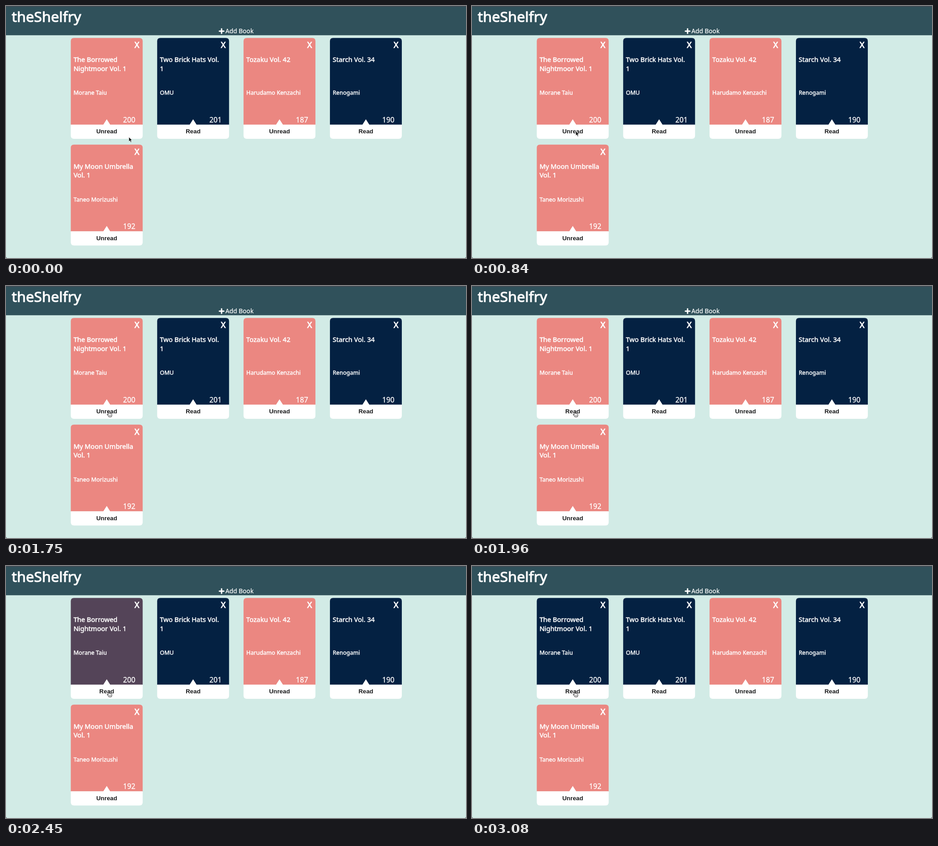
Recreate the animation shown at these times as an HTML page. Size 1011 by 554 pixels, loop 3150 ms.

```html
<!DOCTYPE html>
<html lang="en">
<head>
<meta charset="utf-8">
<title>Book shelf</title>
<style>
  html, body { margin: 0; width: 100%; height: 100%; overflow: hidden; background: #d2ebe6; }
  svg { display: block; width: 100vw; height: 100vh; }
  text { font-family: "Noto Sans", "Open Sans", sans-serif; fill: #fff; stroke: #fff; stroke-width: .3px; stroke-linejoin: round; }
  .brand { font-size: 31.8px; stroke-width: 1.1px; }
  .add { font-size: 13.7px; stroke-width: .2px; }
  .title { font-size: 14.6px; stroke-width: .55px; }
  .author { font-size: 12.6px; stroke-width: .45px; }
  .pages { font-size: 15.8px; }
  .close { font-size: 18px; stroke-width: 1px; text-anchor: middle; }
  .state { font: bold 13.33px "Liberation Sans", Arial, sans-serif; fill: #1b1c1d; stroke: none; text-anchor: middle; }
  .unread { fill: #eb8781; }
  .read { fill: #042142; }

  .toggle .cover { animation: cover 3150ms infinite; }
  .toggle .before { animation: before 3150ms step-end infinite; }
  .toggle .after { animation: after 3150ms step-end infinite; }
  .arrow { animation: glide 3150ms infinite, arrow 3150ms step-end infinite; }
  .hand { animation: nudge 3150ms step-end infinite, hand 3150ms step-end infinite; }

  @keyframes cover {
    0%, 62.2% { fill: #eb8781; animation-timing-function: cubic-bezier(.25, .25, .6, 1); }
    94%, 100% { fill: #042142; }
  }
  @keyframes before { 0% { opacity: 1; } 61.9%, 100% { opacity: 0; } }
  @keyframes after { 0% { opacity: 0; } 61.9%, 100% { opacity: 1; } }
  @keyframes glide {
    0%, 2.2% { transform: translate(270px, 288px); animation-timing-function: ease-in-out; }
    22.2%, 100% { transform: translate(228px, 275px); }
  }
  @keyframes arrow { 0% { opacity: 1; } 37.77%, 100% { opacity: 0; } }
  @keyframes nudge {
    0% { transform: translate(223px, 275px); }
    53.3%, 100% { transform: translate(221.5px, 275px); }
  }
  @keyframes hand { 0% { opacity: 0; } 37.77%, 100% { opacity: 1; } }
</style>
</head>
<body>
<svg viewBox="0 0 1011 554" preserveAspectRatio="none">
  <rect width="1011" height="554" fill="#d2ebe6"/>
  <rect width="1011" height="64.3" fill="#30515b"/>
  <rect width="1011" height="1.5" fill="#434a54"/>
  <path d="M0 551Q0 554 3 554H0ZM1011 551Q1011 554 1008 554H1011Z" fill="#34434a"/>
  <text class="brand" x="12.5" y="35">theShelfry</text>
  <path d="M473.8 50.3V60M469 55.2H478.7" stroke="#fff" stroke-width="3" stroke-linecap="round"/>
  <text class="add" x="482.3" y="60">Add Book</text>
  <g id="shelf"></g>
  <g class="arrow">
    <path d="M0 0V10.2L2.4 8.1L4.2 12L6 11.2L4.3 7.4H7.4Z" fill="#111" stroke="#fff" stroke-width=".8" stroke-linejoin="round"/>
  </g>
  <g class="hand">
    <path d="M3 8.5V2Q3 .8 4 .8Q5 .8 5 2V5Q6.8 4.3 7.2 5.5Q8.7 4.9 9.2 6.1Q11.2 5.7 11.2 7.5V9.6L10 12.8H4.4L3.6 11L.9 7.9Q.5 6.7 1.6 6.8Z"
      fill="#fff" stroke="#222" stroke-width="1" stroke-linejoin="round"/>
    <path d="M5.4 8.5V11M7.3 8.5V11M9.2 8.5V11" stroke="#333" stroke-width=".7"/>
  </g>
</svg>
<script>
  const books = [
    { title: ["The Borrowed", "Nightmoor Vol. 1"], author: "Morane Taiu", pages: 200, toggle: true },
    { title: ["Two Brick Hats Vol.", "1"], author: "OMU", pages: 201, read: true },
    { title: ["Tozaku Vol. 42"], author: "Harudamo Kenzachi", pages: 187 },
    { title: ["Starch Vol. 34"], author: "Renogami", pages: 190, read: true },
    { title: ["My Moon Umbrella", "Vol. 1"], author: "Taneo Morizushi", pages: 192 }
  ];

  const text = (cls, x, y, str) => `<text class="${cls}" x="${x}" y="${y}">${str}</text>`;

  function states(book) {
    if (!book.toggle) return text("state", 79, 210.2, book.read ? "Read" : "Unread");
    return text("state before", 79, 210.2, "Unread") + text("state after", 79, 210.2, "Read");
  }

  function card(book, i) {
    const x = 142.4 + (i % 4) * 189.85;
    const y = 70.3 + Math.floor(i / 4) * 234.4;
    return `<g class="${book.toggle ? "toggle" : ""}" transform="translate(${x} ${y})">
      <path class="cover ${book.read ? "read" : "unread"}" d="M0 191V7Q0 0 7 0H151Q158 0 158 7V191Z"/>
      <path d="M0 190.5H71.5L79 178.7L86.5 190.5H158V214.5Q158 221.7 151 221.7H7Q0 221.7 0 214.5Z" fill="#fff"/>
      ${text("close", 145.3, 21.9, "X")}
      ${book.title.map((line, n) => text("title", 6, 53.2 + n * 19.2, line)).join("")}
      ${text("author", 6, 125.2, book.author)}
      ${text("pages", 114.8, 185.5, book.pages)}
      ${states(book)}
    </g>`;
  }

  document.getElementById("shelf").innerHTML = books.map(card).join("");
</script>
</body>
</html>
```
